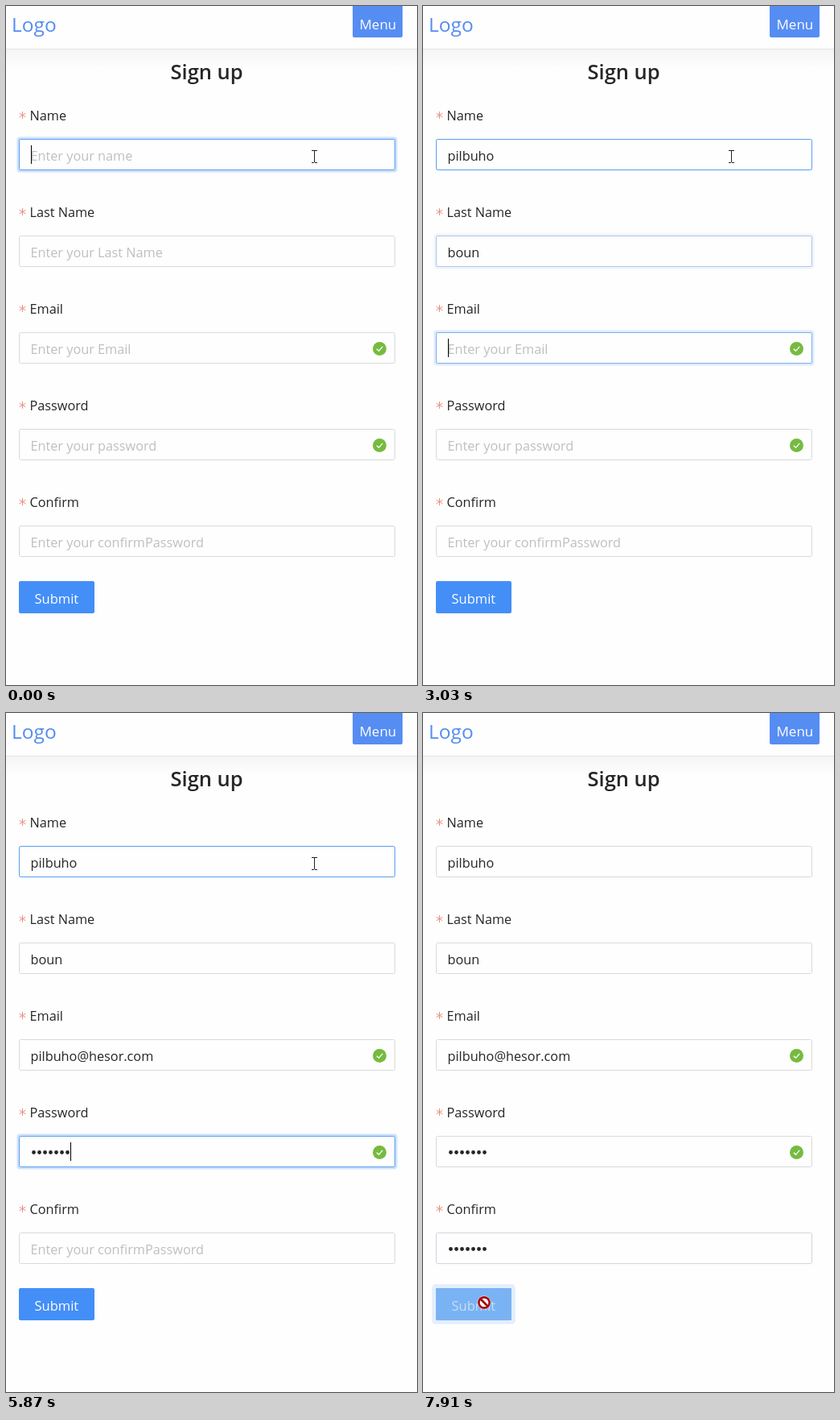
Write an HTML page with a canvas that moves like this. It is 511x843 px and loops after 8000 ms.

```html
<!DOCTYPE html>
<html lang="en">
<head>
<meta charset="utf-8">
<title>Sign up</title>
<style>
html, body { margin: 0; width: 100%; height: 100%; overflow: hidden; background: #fefefe; }
canvas { display: block; width: 511px; height: 843px; }
</style>
</head>
<body>
<canvas id="stage"></canvas>
<script>
const W = 511, H = 843, LOOP = 8000, TICK = 73.5;
const FONT = '"Open Sans", "Noto Sans", sans-serif';
const BLUE = '#5a9ff0', INK = '#262626';
const LEAVE = 6880, CLICK = 7618;

const canvas = document.getElementById('stage');
const ctx = canvas.getContext('2d');
const dpr = window.devicePixelRatio || 1;
canvas.width = W * dpr;
canvas.height = H * dpr;

// A negative key time is a backspace.
const fields = [
  { label: 'Name', hint: 'Enter your name', text: 'pilbuho', focus: [-1000, 1498],
    keys: [280, 720, 860, 930, 1000, 1080, 1300] },
  { label: 'Last Name', hint: 'Enter your Last Name', text: 'boun', focus: [1498, 2878],
    keys: [1870, -2150, 2300, 2370, 2530, 2660] },
  { label: 'Email', hint: 'Enter your Email', text: 'pilbuho@hesor.com', focus: [2878, 5212], valid: true,
    keys: [3470, 3610, 3690, 3830, 3910, 3980, 4050, 4270, 4420, 4490, 4560, 4640, 4780, 4850, 4920, 4990, 5070] },
  { label: 'Password', hint: 'Enter your password', dots: true, focus: [5212, 6018], valid: true,
    keys: [5360, 5430, 5500, 5580, 5650, 5730, 5870] },
  { label: 'Confirm', hint: 'Enter your confirmPassword', dots: true, focus: [6018, CLICK],
    keys: [6160, 6240, 6310, 6380, 6460, 6530, 6740] }
];

const clamp = v => Math.max(0, Math.min(1, v));
const smooth = v => (v = clamp(v), v * v * (3 - 2 * v));

const elapsed = (t, start) => t < start ? -1 : Math.floor((t - start) / TICK) * TICK + 40;
const fade = (t, start) => smooth(elapsed(t, start) / 300);

function write(str, x, y, size, color, weight = 400) {
  ctx.font = `${weight} ${size}px ${FONT}`;
  ctx.fillStyle = color;
  ctx.fillText(str, x, y);
}

function box(x, y, w, h, r) {
  ctx.beginPath();
  ctx.roundRect(x, y, w, h, r);
}

function lines(points, color, width) {
  ctx.beginPath();
  points.forEach(([x, y], i) => i ? ctx.lineTo(x, y) : ctx.moveTo(x, y));
  ctx.strokeStyle = color;
  ctx.lineWidth = width;
  ctx.stroke();
}

function disc(x, y, r, color) {
  ctx.beginPath();
  ctx.arc(x, y, r, 0, Math.PI * 2);
  ctx.fillStyle = color;
  ctx.fill();
}

function drawHeader() {
  const shade = ctx.createLinearGradient(0, 54, 0, 78);
  shade.addColorStop(0, '#f5f5f5');
  shade.addColorStop(1, '#fefefe');
  ctx.fillStyle = shade;
  ctx.fillRect(0, 54, W, 24);
  ctx.fillStyle = '#e4e4e4';
  ctx.fillRect(0, 53, W, 1);
  write('Logo', 7, 32, 24.5, '#548cf0');
  box(431, -4, 62, 43, 2);
  ctx.fillStyle = '#568df2';
  ctx.fill();
  write('Menu', 439.5, 29, 17, '#fff');
  write('Sign up', 204.5, 91, 25.5, INK, 600);
}

function drawStar(x, y) {
  for (let i = 0; i < 3; i++) {
    const a = Math.PI / 2 + i * Math.PI / 3;
    const dx = Math.cos(a) * 4.5, dy = Math.sin(a) * 4.5;
    lines([[x - dx, y - dy], [x + dx, y + dy]], '#ec8d80', 1);
  }
}

function drawField(f, i, t) {
  const y = 165 + i * 120;
  const [start, end] = f.focus;
  const glow = fade(t, start) * (1 - fade(t, end));
  const hover = i === 0 ? 1 - fade(t, LEAVE) : 0;

  drawStar(20.5, y - 29.5);
  write(f.label, 29.5, y - 23, 16.25, INK);

  box(13.5, y - 2.5, 473, 44, 4);
  ctx.fillStyle = `rgba(40, 125, 250, ${0.22 * glow})`;
  ctx.fill();
  box(16.5, y + 0.5, 467, 38, 2);
  ctx.fillStyle = '#fefefe';
  ctx.fill();
  ctx.lineWidth = 1;
  ctx.strokeStyle = '#d9d9d9';
  ctx.stroke();
  ctx.globalAlpha = Math.max(glow, hover);
  ctx.strokeStyle = BLUE;
  ctx.stroke();
  ctx.globalAlpha = 1;

  const done = f.keys.filter(k => Math.abs(k) <= t);
  const count = done.reduce((n, k) => n + Math.sign(k), 0);
  let caret = 31;
  if (!count) {
    write(f.hint, 30.5, y + 27, 16.25, '#bfbfbf');
  } else if (f.dots) {
    for (let n = 0; n < count; n++) disc(34.5 + n * 7, y + 20.5, 2.4, INK);
    caret += count * 7;
  } else {
    const typed = f.text.slice(0, count);
    write(typed, 30.5, y + 27, 16.25, INK);
    caret += Math.round(ctx.measureText(typed).width - 0.5);
  }

  const last = Math.max(0, start, ...done.map(Math.abs));
  if (t >= start && t < end && t - last < 530) {
    ctx.fillStyle = '#000';
    ctx.fillRect(caret, y + 8, 1, 23);
  }

  if (f.valid) {
    disc(464.5, y + 20.5, 8.5, '#76bb40');
    lines([[460.8, y + 20.7], [463.5, y + 23.3], [468.2, y + 17.8]], '#fff', 1.3);
  }
}

function drawButton(t) {
  const off = fade(t, CLICK);
  if (off > 0) {
    const age = elapsed(t, CLICK);
    const grow = 5 * Math.sqrt(1 - (1 - clamp(age / 350)) ** 2);
    box(16 - grow, 714 - grow, 94 + 2 * grow, 40 + 2 * grow, 2 + grow / 2);
    ctx.fillStyle = `rgba(68, 142, 247, ${0.2 - 0.08 * clamp(age / 330)})`;
    ctx.fill();
  }
  box(16, 714, 94, 40, 2);
  ctx.fillStyle = '#448ef8';
  ctx.fill();
  ctx.globalAlpha = off;
  ctx.fillStyle = '#7db5f4';
  ctx.fill();
  ctx.globalAlpha = 1 - 0.45 * off;
  write('Submit', 35.5, 742, 16.5, '#fff');
  ctx.globalAlpha = 1;
}

function drawBeam(x, y) {
  lines([[x + 0.5, y - 7], [x + 0.5, y + 8]], '#222', 1);
  for (const dy of [-6.5, 8.5]) {
    lines([[x - 3, y + dy], [x, y + dy]], '#222', 1);
    lines([[x + 1, y + dy], [x + 4, y + dy]], '#222', 1);
  }
}

function outline(path, x, y) {
  ctx.save();
  ctx.translate(x, y);
  const shape = new Path2D(path);
  ctx.fillStyle = '#fff';
  ctx.fill(shape);
  ctx.lineWidth = 1.1;
  ctx.lineJoin = 'round';
  ctx.strokeStyle = '#111';
  ctx.stroke(shape);
  ctx.restore();
}

function drawHand(x, y) {
  outline('M-1.5 1Q0-1.5 1.5 1V8Q3.5 6 4.7 8.6Q6.7 7 7.9 9.6Q10.8 8.6 11 11.5V16' +
    'Q10.6 18.5 8.8 20V22.5H.3V20.6L-5 13.5Q-5.6 10.8-3.2 11.6L-1.5 13.5Z', x, y);
  for (const dx of [1.5, 4.7, 7.9]) lines([[x + dx, y + 8.5], [x + dx, y + 12]], '#111', 1);
}

function drawForbidden(x, y) {
  disc(x, y, 8.5, '#fff');
  disc(x, y, 8, '#a80d12');
  disc(x, y, 5.3, '#fff');
  lines([[x - 4.2, y - 4.2], [x + 4.2, y + 4.2]], '#a80d12', 2.8);
}

function drawPointer(t) {
  const age = elapsed(t, LEAVE);
  const go = smooth(age / 400);
  const settle = smooth((age - 490) / 190);
  const x = 383 - 317 * go + 10 * settle;
  const y = 186 + 529 * go + 17 * settle;
  if (t >= CLICK + TICK) drawForbidden(x, y);
  else if (y >= 714) drawHand(x, y);
  else if (fields.some((f, i) => Math.abs(y - 184.5 - i * 120) < 20)) drawBeam(Math.round(x), Math.round(y));
  else outline('M0 0V16L3.8 12.6L6.3 18.2L8.9 17L6.4 11.6H11.4Z', x, y);
}

function draw(now) {
  const t = now % LOOP;
  ctx.setTransform(dpr, 0, 0, dpr, 0, 0);
  ctx.fillStyle = '#fefefe';
  ctx.fillRect(0, 0, W, H);
  drawHeader();
  fields.forEach((f, i) => drawField(f, i, t));
  drawButton(t);
  drawPointer(t);
}

const begin = performance.now();
function frame() {
  draw(performance.now() - begin);
  requestAnimationFrame(frame);
}
frame();
</script>
</body>
</html>
```
